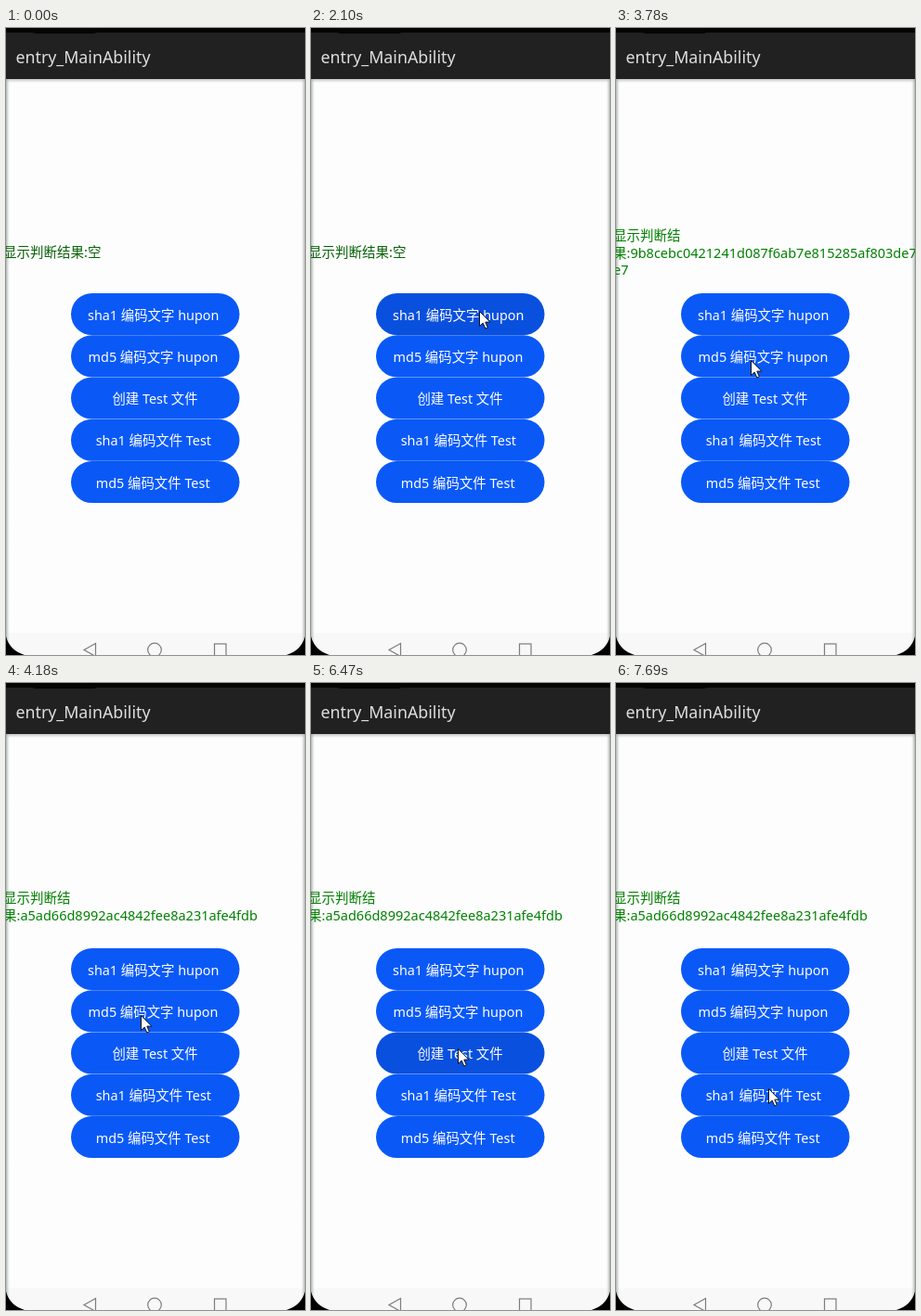
An HTML page that plays this animation: 322 px wide and 676 px high, repeating every 8 s.

```html
<!DOCTYPE html>
<html lang="zh-CN">
<head>
<meta charset="utf-8">
<title>entry_MainAbility</title>
<style>
html, body { margin: 0; width: 100%; height: 100%; overflow: hidden; background: #fdfdfd; }
svg { display: block; width: 322px; height: 676px; font-family: "Noto Sans", "Noto Sans CJK SC", sans-serif; }
.title { font-size: 17.8px; fill: #dedede; }
.result { font-size: 14.5px; fill: #008000; visibility: hidden; }
.btn { fill: #0a59f7; }
.label { font-size: 14.4px; font-weight: 500; fill: #fff; }
.nav { fill: none; stroke: #7c7c7c; stroke-width: 1.2; }

.btn, .result, .ring { animation: 8s step-end infinite; }
.cursor { animation: move 8s linear infinite; }

/* 1% of the loop is 80 ms */
#r0 { fill: #076207; animation-name: empty; }
#r1 { animation-name: sha; }
#r2 { animation-name: md; }
#b0 { animation-name: press0; }
#b1 { animation-name: press1; }
#b2 { animation-name: press2; }
.ring { visibility: hidden; animation-name: click; }

@keyframes empty { 0% { visibility: visible } 27.125%, 100% { visibility: hidden } }
@keyframes sha { 0% { visibility: hidden } 27.125% { visibility: visible } 52.25%, 100% { visibility: hidden } }
@keyframes md { 0% { visibility: hidden } 52.25%, 100% { visibility: visible } }
@keyframes press0 { 24.625% { fill: #0950de } 27.125% { fill: #0a59f7 } }
@keyframes press1 { 51.375% { fill: #0950de } 52.25% { fill: #0a59f7 } }
@keyframes press2 { 80.875% { fill: #0950de } 81.75% { fill: #0a59f7 } }
@keyframes click {
  0%, 22.125%, 47.25%, 77.625%, 96.125%, 100% { visibility: hidden }
  20.5%, 45.625%, 75.125%, 93.625% { visibility: visible }
}
@keyframes move {
  0%, 3.25% { transform: translate(100px, 690px) }
  9.5% { transform: translate(107px, 366px) }
  11.125%, 12.875% { transform: translate(108px, 321px) }
  18%, 30.625% { transform: translate(181px, 305px) }
  33.875% { transform: translate(193px, 318px) }
  36.375%, 37.25% { transform: translate(240px, 341px) }
  42.375%, 61.5% { transform: translate(145px, 358px) }
  64.125% { transform: translate(330px, 345px) }
  64.2%, 66% { transform: translate(330px, 405px) }
  70% { transform: translate(240px, 417px) }
  74.5%, 84.5% { transform: translate(158px, 394px) }
  90.375%, 100% { transform: translate(164px, 437px) }
}
</style>
</head>
<body>
<svg viewBox="0 0 322 676">
  <defs>
    <linearGradient id="edge">
      <stop offset="0" stop-color="#8f9c95" stop-opacity=".75"/>
      <stop offset="1" stop-color="#c8d0cc" stop-opacity="0"/>
    </linearGradient>
    <linearGradient id="shade" x2="0" y2="1">
      <stop offset="0" stop-color="#000" stop-opacity=".22"/>
      <stop offset="1" stop-color="#000" stop-opacity="0"/>
    </linearGradient>
  </defs>

  <rect width="322" height="676" fill="#fdfdfd"/>
  <rect y="652" width="322" height="24" fill="#f8f8f8"/>
  <rect y="55" width="322" height="4" fill="url(#shade)"/>
  <rect id="side" y="55" width="4" height="621" fill="url(#edge)"/>
  <use href="#side" transform="matrix(-1 0 0 1 322 0)"/>
  <path d="M0 656Q4 671 20 676H0ZM322 656Q318 671 302 676H322Z"/>

  <rect width="322" height="55" fill="#212121"/>
  <rect width="322" height="5" fill="#050505"/>
  <rect x="28" y="-4" width="70" height="10" rx="4" fill="#050505"/>
  <text class="title" x="10.5" y="38">entry_MainAbility</text>

  <text id="r0" class="result" x="-3" y="246.5">显示判断结果:空</text>
  <text id="r1" class="result">
    <tspan x="-3" y="229">显示判断结</tspan><tspan x="-3" y="248">果:9b8cebc0421241d087f6ab7e815285af803de7</tspan><tspan x="-3" y="266">e7</tspan>
  </text>
  <text id="r2" class="result">
    <tspan x="-3" y="237">显示判断结</tspan><tspan x="-3" y="256">果:a5ad66d8992ac4842fee8a231afe4fdb</tspan>
  </text>

  <g id="buttons"></g>

  <g class="nav">
    <path d="M84 670.5L96.5 663.5V677.5Z"/>
    <circle cx="160" cy="670.5" r="7.3"/>
    <rect x="224.5" y="664" width="12.5" height="13"/>
  </g>

  <g class="cursor">
    <g class="ring" fill="none">
      <circle r="10" stroke="#222" stroke-width="3"/>
      <circle r="10" stroke="#fff" stroke-width="1.4"/>
    </g>
    <path d="M.5 .5V16.5L4.2 13.1L6.8 19L9.3 17.9L6.8 12.1H11.8Z" fill="#fff" stroke="#111" stroke-width="1"/>
  </g>
</svg>
<script>
const labels = [
  "sha1 编码文字 hupon",
  "md5 编码文字 hupon",
  "创建 Test 文件",
  "sha1 编码文件 Test",
  "md5 编码文件 Test"
];
const centers = [158.7, 158.5, 160.5, 158.9, 158.2];
document.getElementById("buttons").innerHTML = labels.map((label, i) => {
  const y = 286 + i * 45.25;
  return `<rect id="b${i}" class="btn" x="70" y="${y}" width="181.5" height="45.1" rx="22.5"/>
    <text class="label" x="${centers[i]}" y="${y + 28.7}" text-anchor="middle">${label}</text>`;
}).join("");
</script>
</body>
</html>
```
